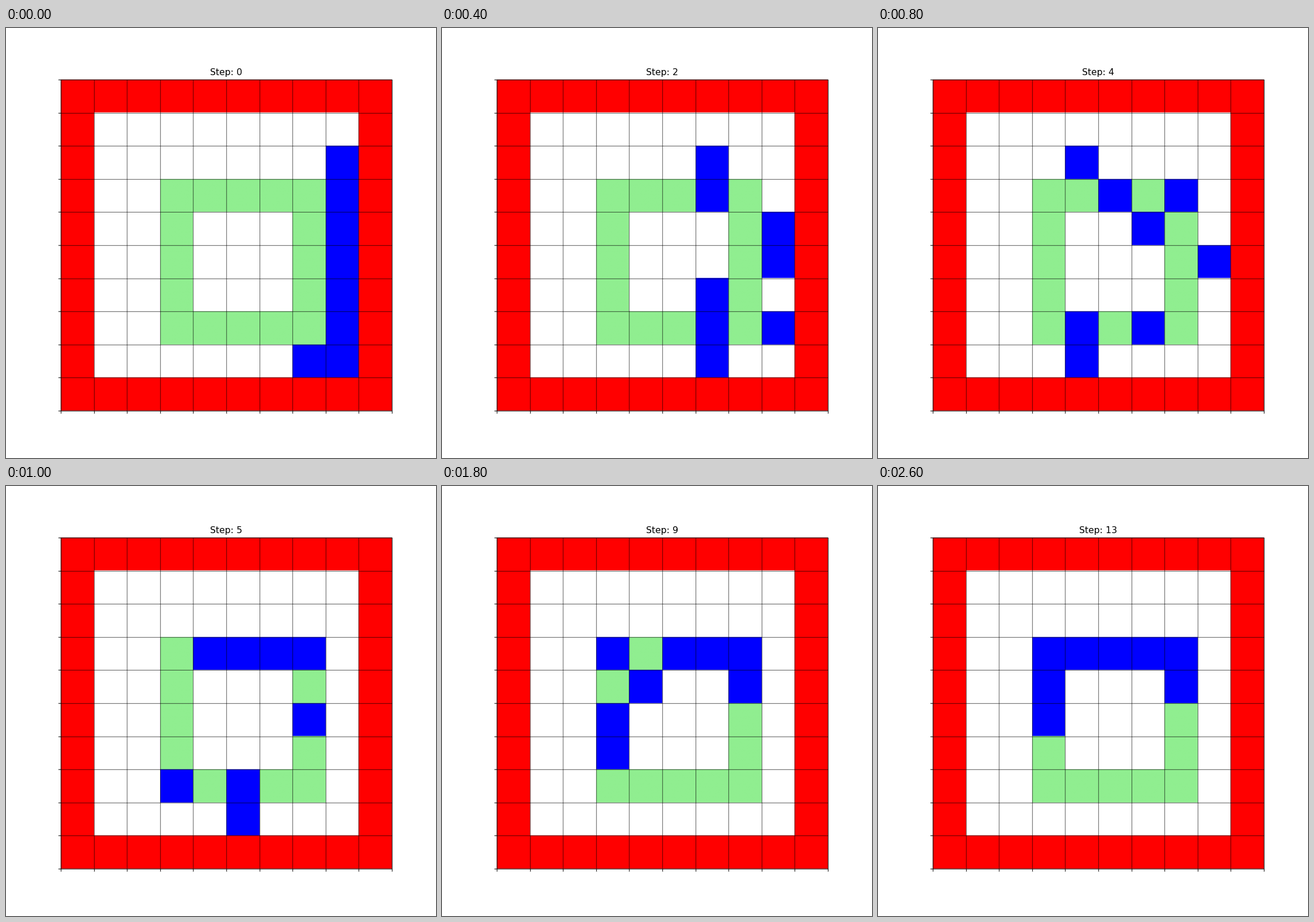
Recreate the animation shown at these times as a matplotlib script. Size 748 by 748 pixels, loop 2.8 s.

```python
import matplotlib.pyplot as plt
import numpy as np
from matplotlib.animation import FuncAnimation
from matplotlib.colors import to_rgb
from matplotlib.patches import Rectangle

SIZE = 10
STEPS = 14
STAGE = 800  # layout units along each side
LEFT, TOP, CELL = 102, 96, 61.6
TICK = 4.9
EMPTY, WALL, GOAL, AGENT = range(4)
COLORS = np.array([to_rgb(c) for c in ("white", "red", "lightgreen", "blue")])
MOVES = {"U": (-1, 0), "D": (1, 0), "L": (0, -1), "R": (0, 1)}

# Start cell (row, column) and the moves until the agent parks.
AGENTS = [
    ((2, 8), "LLLLDL"),
    ((3, 8), "LLL"),
    ((4, 8), "LRLU"),
    ((5, 8), "LRLRLU"),
    ((6, 8), "LLUUU"),
    ((8, 7), "ULLLLUU"),
    ((7, 8), "DULLLLUUUL"),
    ((8, 8), "LLLLRLLUURUUU"),
]


def make_board():
    board = np.full((SIZE, SIZE), WALL)
    board[1:-1, 1:-1] = EMPTY
    board[3:8, 3:8] = GOAL
    board[4:7, 4:7] = EMPTY
    return board


def position(start, path, step):
    row, col = start
    for move in path[:step]:
        dr, dc = MOVES[move]
        row, col = row + dr, col + dc
    return row, col


def grid_at(step):
    grid = make_board()
    for start, path in AGENTS:
        grid[position(start, path, step)] = AGENT
    return grid


def edges(start):
    return np.round(start + CELL * np.arange(SIZE + 1))


def cell_index(start):
    """Cell number for each layout unit; 0 and SIZE + 1 lie off the board."""
    return np.searchsorted(edges(start), np.arange(STAGE), side="right")


# The cells sit a fraction above the grid lines.
PIXELS = np.ix_(cell_index(TOP - 0.2), cell_index(LEFT))


def picture(step):
    return COLORS[np.pad(grid_at(step), 1)[PIXELS]]


fig = plt.figure(figsize=(8, 8), dpi=93.5)
ax = fig.add_axes([0, 0, 1, 1])
ax.axis("off")
image = ax.imshow(picture(0), extent=(0, STAGE, STAGE, 0),
                  interpolation="bilinear", aspect="auto")

xs, ys = edges(LEFT) + 0.5, edges(TOP) + 0.5
thin = dict(color="black", linewidth=0.5, snap=False)
bold = dict(color="black", linewidth=0.8, snap=False)
ax.vlines(xs[1:-1], ys[0], ys[-1], **thin)
ax.hlines(ys[1:-1], xs[0], xs[-1], **thin)
ax.vlines(xs, ys[-1], ys[-1] + TICK, **bold)
ax.hlines(ys, xs[0] - TICK, xs[0], **bold)
ax.add_patch(Rectangle((xs[0], ys[0]), xs[-1] - xs[0], ys[-1] - ys[0],
                       fill=False, **bold))
title = ax.text(LEFT + CELL * SIZE / 2, TOP - 8.3, "Step: 0",
                fontsize=12, ha="center", va="baseline")


def update(step):
    image.set_data(picture(step))
    title.set_text(f"Step: {step}")
    return image, title


anim = FuncAnimation(fig, update, frames=STEPS, interval=200, repeat=True)
plt.show()
```
